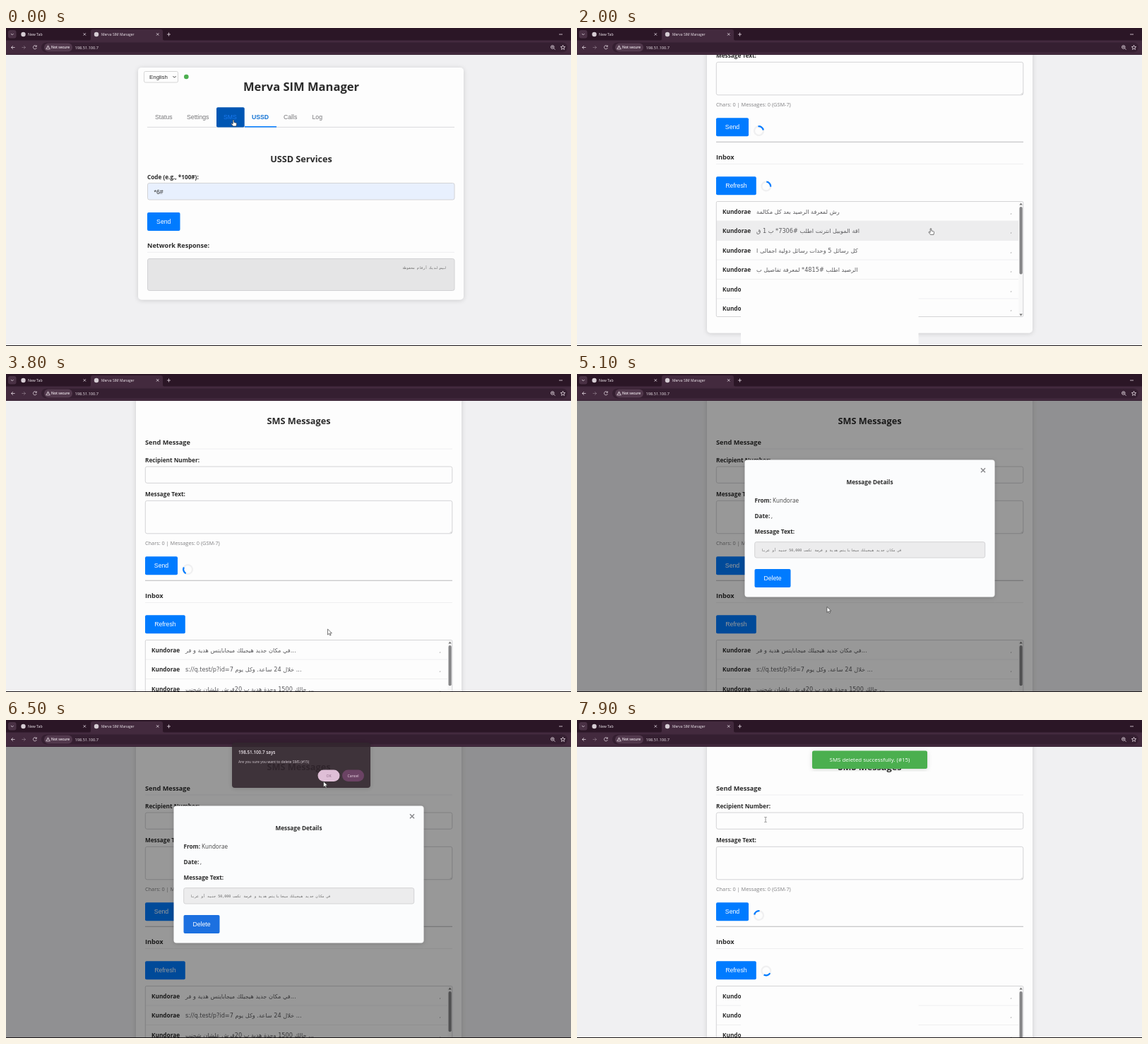
Write an HTML page that moves like this. It is 800 by 450 pixels and loops after 8000 ms.

```html
<!DOCTYPE html>
<html lang="en">
<head>
<meta charset="utf-8">
<title>SMS panel</title>
<style>
  html, body { margin: 0; width: 100%; height: 100%; overflow: hidden; background: #f0f0f2; }
  svg { display: block; width: 100%; height: 100%; }
  text { font-family: "Open Sans", "Noto Sans", "DejaVu Sans", sans-serif; white-space: pre; }
  .ui { font-family: "Liberation Sans", Arial, sans-serif; }
  .ar { font-family: "DejaVu Sans", sans-serif; }
  .mono { font-family: "DejaVu Sans Mono", monospace; }
  .icon { fill: none; stroke: #e8dce5; stroke-width: .8; }
</style>
</head>
<body>
<svg viewBox="0 0 800 450">
  <defs>
    <filter id="shadow" x="-10%" y="-10%" width="120%" height="125%">
      <feDropShadow dx="0" dy="1" stdDeviation="3" flood-opacity=".16"/>
    </filter>
  </defs>
  <rect width="800" height="450" fill="#f0f0f2"/>
  <g id="page"></g>
  <g id="browser">
    <rect width="800" height="38" fill="#2b1626"/>
    <rect y="17.5" width="800" height="20" fill="#432a3e"/>
    <path d="M117 18q3 0 3-3V5q0-3 3-3h96q3 0 3 3v10q0 3 3 3z" fill="#432a3e"/>
    <rect x="3" y="3" width="11.5" height="11.5" rx="3" fill="#4a3145"/>
    <path class="icon" d="M7 8l1.8 1.8L10.600 8M109.600 7.200l3.400 3.400m0-3.400l-3.400 3.400M213 7.200l3.400 3.400m0-3.400l-3.400 3.400M228 9h5m-2.500-2.500v5M783 9h5"/>
    <circle cx="24.500" cy="9" r="3.200" fill="#d6cdd4"/>
    <circle cx="128" cy="9" r="3.200" fill="#d6cdd4"/>
    <rect x="50" y="20.500" width="745" height="14" rx="7" fill="#351f31"/>
    <rect x="54" y="21.500" width="40" height="12" rx="6" fill="#52394d"/>
    <path class="icon" d="M12.500 27.500h-5m2.300-2.300l-2.300 2.300 2.300 2.300M43 25.800a2.500 2.500 0 1 0 .3 2.400M43.300 24.500v1.800h-1.800M59.500 24.800l2.800 5h-5.600zM59.500 26.600v1.500"/>
    <path class="icon" opacity=".4" d="M22.500 27.500h5m-2.300-2.300l2.300 2.300-2.300 2.300"/>
    <path class="icon" d="M775.500 28.700l2 2M772.500 27h2.600m-1.300-1.300v1.300M788.500 24.300l.9 2.100 2.300.2-1.800 1.500.6 2.300-2-1.200-2 1.200.6-2.300-1.800-1.500 2.300-.2z"/>
    <circle class="icon" cx="773.800" cy="27" r="2.300"/>
    <g fill="#f1e9ef">
      <text x="31" y="10.900" font-size="5.200">New Tab</text>
      <text x="135" y="10.900" font-size="5">Merva SIM Manager</text>
      <text x="64" y="29.300" font-size="5" font-weight="600">Not secure</text>
      <text x="97.500" y="29.500" font-size="5.650">198.51.100.7</text>
    </g>
  </g>
  <g id="overlay"></g>
  <rect y="449" width="800" height="1" fill="#1b1719"/>
  <g id="pointer"></g>
</svg>
<script>
const LOOP = 8000, STEP = 100, ROW = 27.5, LIST_TOP = 376.5, LIST_MAX = 163;
const SENDER = 'Kundorae', BLUE = '#007bff', NAVY = '#0056b3', INK = '#2b2b2b';
const layer = id => document.getElementById(id);

// Oldest first; the inbox shows the newest on top.
const inbox = ['', '', 'رصيدك الحالى', 'شكرا لك', 'تم التجديد',
  'الرصيد اطلب #4815* لمعرفة تفاصيل ب',
  'كل رسائل 5 وحدات رسائل دولية اجمالى ا',
  'اقة الموبيل انترنت اطلب #7306* ب 1 ق',
  'رش لمعرفة الرصيد بعد كل مكالمة',
  'عرض اليوم لك', 'اطلب الان', 'استمتع بالخدمة',
  'جالك 1500 وحدة هدية ب 20قرش علشان شحنت ...',
  's://q.test/p?id=7 خلال 24 ساعة. وكل يوم ...',
  'في مكان جديد هيجيلك ميجابايتس هدية و فر...'];
const fullText = 'في مكان جديد هيجيلك ميجابايتس هدية و فرصة تكسب 50,000 جنيه أو عربا';

const scrollKeys = [[0, 0], [400, 0], [900, 106], [1300, 106], [1700, 251], [2500, 251], [3300, 120]];
const pointerKeys = [[0, 322, 130], [200, 322, 130], [900, 559, 239], [1300, 559, 239], [2000, 501, 283.5],
  [2500, 501, 283.5], [3800, 455.5, 361], [4200, 440, 388], [4500, 440, 388], [5600, 288.5, 285],
  [5900, 288.5, 285], [6400, 449.5, 87], [6700, 449.5, 87], [7700, 267, 141]];

function track(keys, t, axis = 1) {
  const i = keys.findIndex(k => k[0] > t);
  if (i < 0) return keys[keys.length - 1][axis];
  const a = keys[i - 1], b = keys[i], u = (t - a[0]) / (b[0] - a[0]);
  return a[axis] + (b[axis] - a[axis]) * u * u * (3 - 2 * u);
}

const rect = (x, y, w, h, fill, extra = '') =>
  `<rect x="${x}" y="${y}" width="${w}" height="${h}" fill="${fill}" ${extra}/>`;
const text = (x, y, size, str, fill = INK, extra = '') =>
  `<text x="${x}" y="${y}" font-size="${size}" fill="${fill}" ${extra}>${str}</text>`;
const bold = (x, y, size, str, extra = '') => text(x, y, size, str, INK, 'font-weight="700" ' + extra);
const line = (x, y, w, color, weight = .8) => rect(x, y - weight / 2, w, weight, color);
const MID = 'text-anchor="middle"';

const field = (x, y, w, h, fill = '#fdfdfd') => rect(x, y, w, h, fill, 'rx="2.5" stroke="#d0d0d2" stroke-width=".9"');
const button = (x, y, w, label, fill = BLUE) =>
  rect(x, y, w, 26, fill, 'rx="2"') + text(x + w / 2, y + 16, 8.7, label, '#fff', 'class="ui" ' + MID);
const spinner = (x, y, angle) =>
  `<g transform="translate(${x} ${y}) rotate(${angle})" fill="none" stroke-width="2.2">
    <circle r="6.4" stroke="#f0f0f1"/><path d="M-4.5-4.5A6.4 6.400 0 0 1 4.500-4.500" stroke="${BLUE}"/></g>`;

function header(sms, hover) {
  const tabs = [['Status', 211], ['Settings', 256], ['SMS', 308], ['USSD', 348], ['Calls', 393], ['Log', 433.5]];
  const active = sms ? 'SMS' : 'USSD';
  return rect(195.5, 61.500, 48, 15.500, '#fdfdfd', 'rx="2" stroke="#ccc" stroke-width=".8"') +
    text(203, 72, 7.9, 'English', INK, 'class="ui"') +
    '<path d="M236.500 68.200l2 2 2-2" fill="none" stroke="#333"/><circle cx="255.300" cy="69" r="3.300" fill="#4caf50"/>' +
    bold(418, 89, 16.55, 'Merva SIM Manager', MID) +
    line(200, 140.300, 435, '#d9d9dc', 1) +
    (hover ? rect(298, 112.300, 39.700, 28.200, NAVY, 'rx="2"') : '') +
    rect(sms ? 298 : 338, 139, sms ? 40 : 45, 1.5, BLUE) +
    tabs.map(([name, x]) => text(x, 129, 8.7, name,
      name === active ? '#1474d4' : name === 'SMS' && hover ? '#1878f0' : '#77777a',
      `class="ui" font-weight="${name === active ? 700 : 400}"`)).join('');
}

function ussdPage() {
  return rect(187, 56, 461, 328.500, '#fdfdfd', 'rx="5" filter="url(#shadow)"') + header(false, true) +
    bold(418, 190, 12.65, 'USSD Services', MID) +
    bold(200, 213.700, 8.2, 'Code (e.g., *100#):') +
    field(200.500, 219.500, 434.500, 23.500, '#e8f0fe') + text(209.500, 234.500, 8.7, '*6#', INK, 'class="ui"') +
    button(200, 261, 46.500, 'Send') +
    bold(200, 310.500, 9.1, 'Network Response:') + line(200, 317.300, 435, '#ececee') +
    field(200.500, 326.500, 434.500, 45, '#e5e5e6') +
    text(623, 341.300, 4.9, 'ليس لديك أرقام محفوظة', '#666', 'class="mono" text-anchor="end"');
}

function messageList(count, hovered) {
  const height = Math.min(LIST_MAX, Math.max(1, count * ROW + 1)), bars = count > 5;
  const right = bars ? 625 : 631.5, shown = Math.min(count, 6);
  let out = '';
  for (let i = 0; i < shown; i++) {
    const y = LIST_TOP + i * ROW, index = count - 1 - i;
    const h = Math.min(ROW, height - i * ROW);
    if (i === hovered) out += rect(197.500, y, right - 197.500, h, '#ededee');
    out += bold(206, y + 17, 8.25, index < 2 ? '+9990' : SENDER) +
      text(254, y + 17, 8.2, inbox[index], '#5c5c5f', 'class="ar"') +
      text(right - 11, y + 17, 7, ',', '#777');
    if (i < shown - 1) out += line(197.500, y + ROW, right - 197.500, '#ebebed');
  }
  if (bars) {
    const thumb = 145 * LIST_MAX / Math.max(LIST_MAX, count * ROW);
    out += rect(625.300, LIST_TOP + .5, 6.200, height - 1, '#f8f8f8') +
      rect(626.500, 384, 4.200, thumb, '#858587', 'rx="2.1"') +
      '<path d="M626.400 381.500l2.200-3 2.200 3zM626.400 535.500l2.200 3 2.200-3z" fill="#777"/>';
  }
  return out + rect(197.300, LIST_TOP, 434.500, height, 'none', 'rx="1.5" stroke="#d0d0d2" stroke-width=".9"');
}

function smsPage(s) {
  const bottom = LIST_TOP + Math.min(LIST_MAX, s.count * ROW + 1) + 23;
  return `<g transform="translate(0 ${120 - s.scroll})">` +
    rect(184, -64, 461, bottom + 64, '#fdfdfd', 'rx="5" filter="url(#shadow)"') +
    `<g transform="translate(-3 -120)">${header(true, s.tabHover)}</g>` +
    bold(414.500, 71, 12.7, 'SMS Messages', MID) +
    bold(197, 99.500, 9.17, 'Send Message') + line(197, 106, 435, '#ececee') +
    bold(197, 124.700, 8.22, 'Recipient Number:') + field(197.300, 131, 434.500, 23.300) +
    bold(197, 173, 8.22, 'Message Text:') + field(197.300, 179.300, 434.500, 46.500) +
    '<path d="M628.500 225l2.500-2.500m-1 2.500l1-1" stroke="#aaa" stroke-width=".5"/>' +
    text(197, 241.700, 7.34, 'Chars: 0 | Messages: 0 (GSM-7)', '#808083') +
    button(197, 258.200, 46, 'Send') + spinner(257.500, 276.500, s.t * .72 + 36) +
    line(197, 292.300, 435, '#c4c4c6', 1.2) +
    bold(197, 316.800, 9.17, 'Inbox') + line(197, 323.500, 435, '#ececee') +
    button(197, 341.300, 56.800, 'Refresh') +
    (s.loading ? spinner(267.800, 355, s.t * .72 + (s.t < 4000 ? 50 : -123)) : '') +
    messageList(s.count, s.hovered) + '</g>' +
    (s.cover ? rect(232, s.cover, 251.500, 450 - s.cover, '#fdfdfd') : '');
}

function modal(deleteFill) {
  return rect(0, 38, 800, 412, '#000', 'opacity=".4"') +
    rect(237.500, 121.500, 354, 194, '#fbfcfd', 'rx="4" filter="url(#shadow)"') +
    '<path d="M572 133.200l6 6m0-6l-6 6" stroke="#8a8a8d" stroke-width="1.500"/>' +
    bold(414.500, 156.300, 8.22, 'Message Details', MID) +
    bold(251.500, 182.300, 8.2, 'From:') + text(277, 182.300, 8.1, SENDER, '#444') +
    bold(251.500, 204.200, 8.2, 'Date:') + text(275, 204.200, 8.1, ',', '#444') +
    bold(251.500, 226, 8.2, 'Message Text:') +
    field(251.700, 237.700, 326, 22.300, '#ececed') +
    text(261, 250.500, 5, fullText, '#666', 'class="mono"') +
    button(251.500, 276, 51, 'Delete', deleteFill);
}

const confirmBox = () => '<g opacity=".88">' +
  rect(320, 32, 196, 64, '#30262d', 'rx="4" filter="url(#shadow)"') + '</g>' +
  text(329, 48.200, 6.3, '198.51.100.7 says', '#eee6ec', 'font-weight="600"') +
  text(329, 61, 5.1, 'Are you sure you want to delete SMS (#15)', '#d8ced5') +
  rect(441.500, 70.500, 31, 16.500, '#dfbfd7', 'rx="8.2"') + text(457, 80.800, 5.2, 'OK', '#8f6a87', MID) +
  rect(476, 70.500, 31, 16.500, '#6b4364', 'rx="8.2"') + text(491.500, 80.800, 5.2, 'Cancel', '#f0dcea', MID);

const toast = () => rect(333, 43.500, 163, 25.500, '#4caf50', 'rx="2.500" filter="url(#shadow)"') +
  text(414.500, 59.300, 7.9, 'SMS deleted successfully. (#15)', '#fff', MID);

const shapes = {
  arrow: '<path d="M0 0v8l2-1.800 1.300 2.800 1.300-.6-1.300-2.700h2.600z" fill="#fff" stroke="#222" stroke-width=".6"/>',
  hand: '<path d="M-.8.5q.8-1 1.600 0v3l3 .8q1 .4.8 1.600l-.6 3h-4.500l-2.600-3.400q.3-1 1.300-.4l1 .8z" fill="#fff" stroke="#222" stroke-width=".6"/>',
  beam: '<path d="M-1.700-3.500h1.200l.5.4.5-.4h1.200M0-3v6M-1.700 3.500h1.200l.5-.4.5.4h1.200" fill="none" stroke="#666" stroke-width=".7"/>'
};

function pointerShape(t) {
  const changes = [[0, 'hand'], [400, 'arrow'], [700, 'beam'], [1500, 'hand'], [2700, 'arrow'],
    [4000, 'hand'], [4500, 'arrow'], [5400, 'hand'], [6000, 'arrow'], [7500, 'beam']];
  return shapes[changes.filter(c => c[0] <= t).pop()[1]];
}

function render(t) {
  const x = track(pointerKeys, t), y = track(pointerKeys, t, 2), scroll = track(scrollKeys, t);
  const received = start => Math.max(0, Math.floor((t - start) / 157) + 1);
  const reloading = t >= 6700, modalOpen = t >= 4400 && !reloading;
  const count = reloading ? Math.max(2, received(6800)) : Math.min(15, received(600));
  const listY = LIST_TOP + 120 - scroll;
  const inList = !modalOpen && x > 197 && x < 625 && y > listY && y < listY + LIST_MAX;
  const state = {
    t, scroll, count,
    tabHover: t < 400,
    loading: t < 2900 || reloading,
    hovered: inList ? Math.floor((y - listY) / ROW) : -1,
    cover: reloading ? 378 : t >= 400 && t < 2600 ? 359 : 0
  };
  layer('page').innerHTML = (t < 200 ? ussdPage() : smsPage(state)) +
    (modalOpen ? modal(t >= 5400 && t < 6000 ? NAVY : t < 6000 ? BLUE : '#1c70e0') : '');
  layer('overlay').innerHTML = t >= 5900 && t < 6700 ? confirmBox() : reloading ? toast() : '';
  layer('pointer').innerHTML = `<g transform="translate(${x} ${y})">${pointerShape(t)}</g>`;
}

const began = performance.now();
let shown = -1;
function tick() {
  const t = Math.floor(((performance.now() - began) % LOOP) / STEP) * STEP;
  if (t !== shown) render(shown = t);
  requestAnimationFrame(tick);
}
tick();
</script>
</body>
</html>
```
